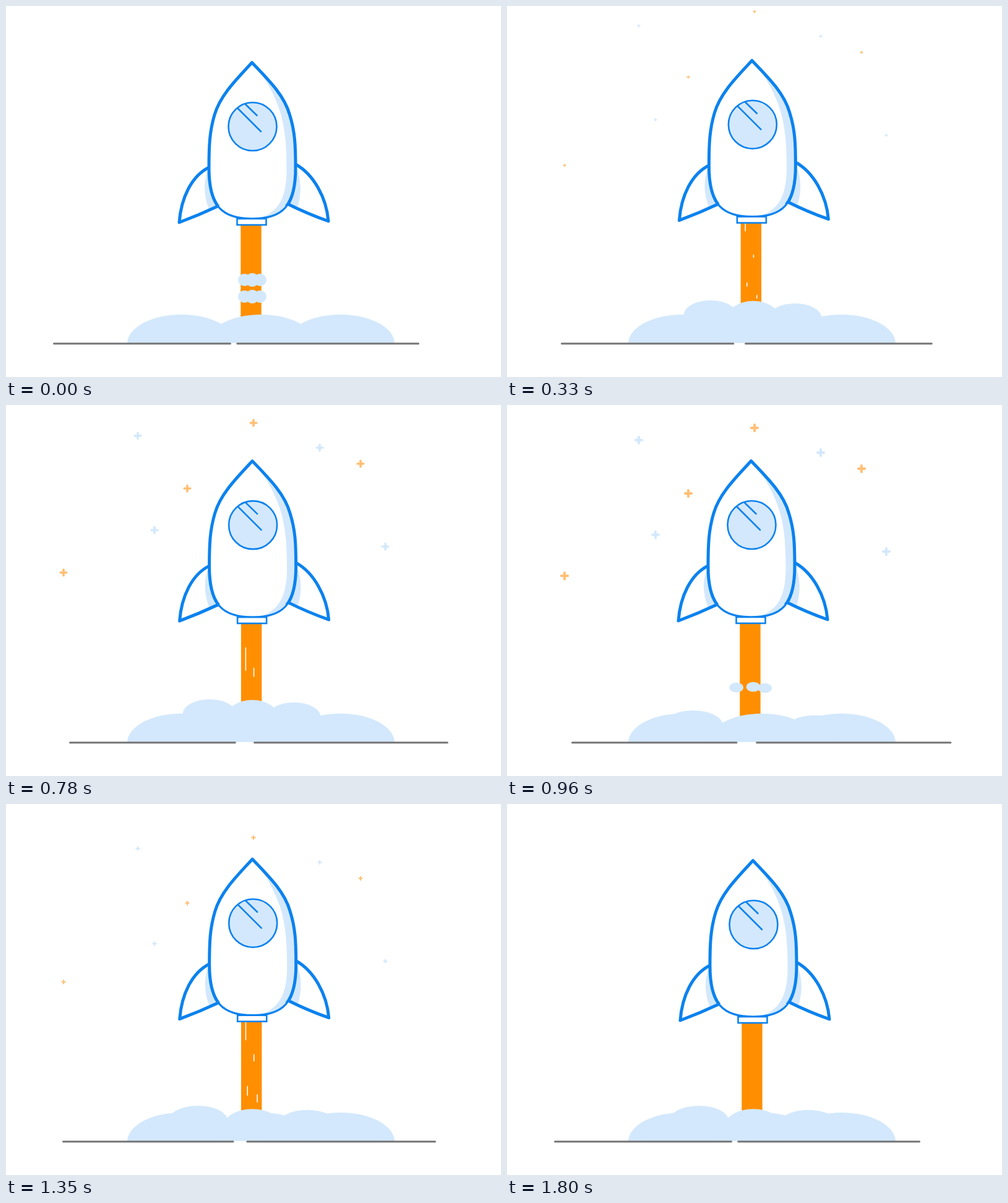
An HTML page with a canvas that plays this animation: 800 px wide and 600 px high, repeating every 1830 ms.

```html
<!DOCTYPE html>
<html lang="en">
<head>
<meta charset="utf-8">
<title>Rocket launch</title>
<style>
  html, body { margin: 0; width: 100%; height: 100%; overflow: hidden; background: #fff; }
  canvas { display: block; width: 800px; height: 600px; }
</style>
</head>
<body>
<canvas id="stage" width="800" height="600"></canvas>
<script>
const ctx = document.getElementById('stage').getContext('2d');
const LOOP = 1830, STEP = 30, HALF = 900;
const BLUE = '#0b82ee', PALE = '#d3e8fc', ORANGE = '#ff8f00', PEACH = '#ffbf75', GREY = '#747476';

const clamp = v => Math.max(0, Math.min(1, v));

// Rocket shake: time, dx, dy
const SHAKE = [
  [0, 0, 0], [330, -1.6, -3.3], [570, 4.8, -0.7], [960, -3, -1],
  [1350, 0.7, -2.3], [1590, 4.8, 0.2], [1800, 0, 0]
];

// Star places at the middle of the loop; colours alternate
const STARS = [[93, 275], [213, 55], [293, 141], [240, 208], [400, 35], [507, 75], [573, 101], [613, 235]];

const BODY_TOP = 'C328 225 329 203 337 176 C346 145 371 120 397.5 91.5 C425 120 450 145 458.5 176 C467 203 468 225 468 262';
const shapes = {
  body: new Path2D(`M328 262 ${BODY_TOP} C468 325 446 344 398 344 C350 344 328 325 328 262 Z`),
  shade: new Path2D('M405 100 C428 124 450 145 458.5 176 C467 203 468 225 468 262 C468 316 446 340 412 342 C440 333 453 310 453.5 268 C454 215 449 180 434 148 C427 131 415 113 405 100 Z'),
  leftFin: new Path2D('M328 261 C300 275 283 310 280 350 Q312 338 343 323.5'),
  rightFin: new Path2D('M468 256 C497 272 518 310 521 348 Q487 336 455 320'),
  leftShade: new Path2D('M328 262 Q314 292 328 329 L343 322 Z'),
  rightShade: new Path2D('M468 259 Q482 290 471 326 L455 319 Z'),
  glare: new Path2D('M374 165 L412 203 M387 159 L405.5 177')
};

function shakeAt(t) {
  const i = Math.max(1, SHAKE.findIndex(key => key[0] >= t));
  const [t0, x0, y0] = SHAKE[i - 1], [t1, x1, y1] = SHAKE[i];
  const k = (t - t0) / (t1 - t0);
  return [x0 + (x1 - x0) * k, y0 + (y1 - y0) * k];
}

function fill(path, color) {
  ctx.fillStyle = color;
  ctx.fill(path);
}

function stroke(path, color, width) {
  ctx.strokeStyle = color;
  ctx.lineWidth = width;
  ctx.stroke(path);
}

function line(x1, y1, x2, y2, color, width) {
  const p = new Path2D();
  p.moveTo(x1, y1);
  p.lineTo(x2, y2);
  stroke(p, color, width);
}

function oval(x, y, rx, ry) {
  ctx.beginPath();
  ctx.ellipse(x, y, rx, ry, 0, 0, Math.PI * 2);
  ctx.fill();
}

function clipped(x, y, w, h, paint) {
  ctx.save();
  ctx.beginPath();
  ctx.rect(x, y, w, h);
  ctx.clip();
  paint();
  ctx.restore();
}

function drawStars(t, swell) {
  if (swell < 0.02) return;
  const arm = 5.5 * swell, width = 4.2 * swell;
  STARS.forEach(([x, midY], i) => {
    // The far left drifts more slowly
    const speed = 0.0444 - 0.00008 * Math.max(0, 280 - x);
    const y = midY + speed * (t - HALF - STEP * 0.5);
    const color = i % 2 ? PALE : PEACH;
    line(x - arm, y, x + arm, y, color, width);
    line(x, y - arm, x, y + arm, color, width);
  });
}

// A streak grows as it slides down, then its top catches up with its end
function drawStreak(age, x, y, speed, growth) {
  const top = y + speed * age, length = growth * age;
  const gone = clamp((age - 450) / 180);
  if (age > 0 && gone < 1) line(x, top + length * gone, x, top + length, '#fff', 1.6);
}

function drawFlame(t) {
  const age = t % HALF - 240;
  ctx.fillStyle = ORANGE;
  ctx.fillRect(379.3, 350, 33.4, 170);
  ctx.lineCap = 'butt';
  drawStreak(age, 386.8, 355, 0, 0.14);
  drawStreak(age, 400, 404.4, 0.0125, 0.054);
  drawStreak(age, 389.5, 444.5, 0.067, 0.073);
  drawStreak(age, 405.4, 470, 0.01, 0.06);
  ctx.lineCap = 'round';
}

function drawRocket() {
  for (const side of ['left', 'right']) {
    fill(shapes[side + 'Fin'], '#fff');
    fill(shapes[side + 'Shade'], PALE);
    stroke(shapes[side + 'Fin'], BLUE, 5);
  }
  fill(shapes.body, '#fff');
  fill(shapes.shade, PALE);
  stroke(shapes.body, BLUE, 3.2);
  clipped(300, 80, 200, 243, () => stroke(shapes.body, BLUE, 5));

  ctx.fillStyle = PALE;
  oval(398.5, 195, 39, 39);
  ctx.strokeStyle = BLUE;
  ctx.lineWidth = 2.6;
  ctx.stroke();
  stroke(shapes.glare, BLUE, 2.6);

  ctx.lineJoin = 'miter';
  ctx.fillStyle = '#fff';
  ctx.fillRect(373.5, 344, 47, 10);
  ctx.strokeRect(373.5, 344, 47, 10);
  ctx.lineJoin = 'round';
}

// Three puffs swell, spread and sink into the bank of smoke
function drawPuffs(age) {
  if (age <= 0 || age > 560) return;
  const rx = 48 * (1 - (1 - age / 480) ** 2);
  const puff = (x, top, maxRy) => {
    const ry = Math.min(maxRy, rx * 0.7);
    oval(x, top + ry, rx, ry);
  };
  puff(380 - 0.155 * age, 443 + 0.1 * age, 24);
  puff(398, 443 + 0.08 * age + 0.00007 * age * age, 30);
  puff(406 + 0.18 * age, 443 + 0.115 * age, 24);
}

function drawSmoke(t) {
  ctx.fillStyle = PALE;
  for (let i = 0; i < 3; i++) oval(283.5 + 128.5 * i, 546, 87.5, 47);
  for (let birth = 0; birth < LOOP; birth += HALF / 2) drawPuffs(t - birth);

  // Opening burst, one step long
  if (t === 0) {
    for (const y of [443, 470]) {
      for (const side of [-1, 0, 1]) oval(398 + 12.5 * side, y, 10.5, 11 - Math.abs(side));
    }
  }
}

function draw(t) {
  const swell = clamp(1 - Math.abs(t - HALF) / HALF);
  ctx.clearRect(0, 0, 800, 600);
  ctx.lineCap = ctx.lineJoin = 'round';

  drawStars(t, swell);

  ctx.save();
  ctx.translate(...shakeAt(t));
  drawFlame(t);
  drawRocket();
  ctx.restore();

  clipped(0, 0, 800, 545, () => drawSmoke(t));

  line(77.5 + 30 * swell, 546, 362.5 + 9 * swell, 546, GREY, 3);
  line(373.8 + 32 * swell, 546, 666.5 + 54 * swell, 546, GREY, 3);
}

const start = performance.now();
function tick() {
  const t = (performance.now() - start) % LOOP;
  draw(Math.floor(t / STEP) * STEP);
  requestAnimationFrame(tick);
}
tick();
</script>
</body>
</html>
```
